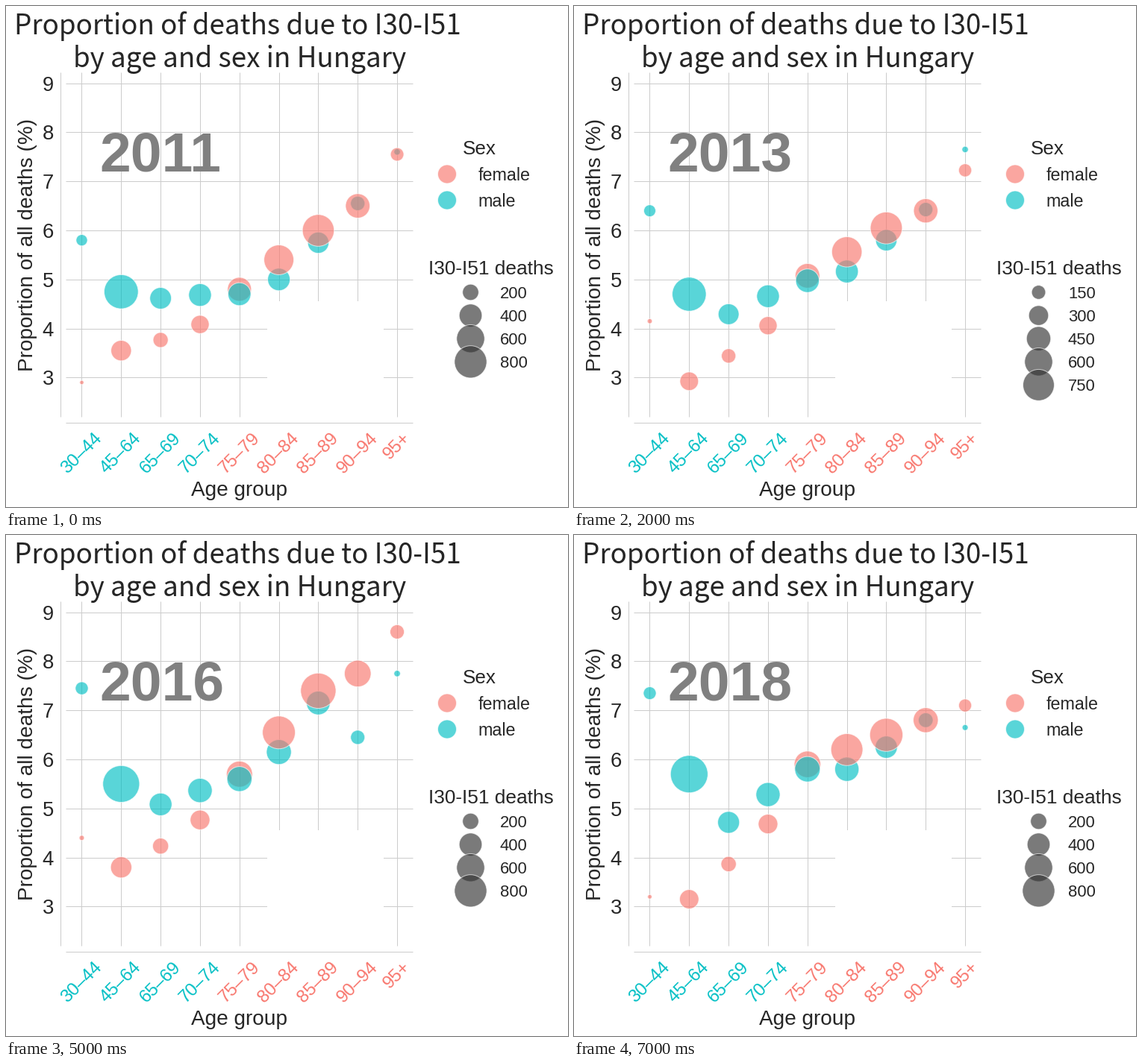
A matplotlib script for the animation above (8000 ms loop, 753 px wide and 672 px high).

```python
import math

import matplotlib.pyplot as plt
import numpy as np
from matplotlib.animation import FuncAnimation
from matplotlib.patches import Circle, Rectangle

W, H, DPI = 753, 672, 64
INK, GRID = "#262626", "#cccccc"
CORAL, TEAL = "#f8766d", "#00bfc4"
SANS = "Liberation Sans"

AGES = ["30–44", "45–64", "65–69", "70–74", "75–79",
        "80–84", "85–89", "90–94", "95+"]
IDX = np.arange(len(AGES))

# Shares (%) at key ages in key years; the rest is interpolated
KEY_YEARS = [2011, 2012, 2014, 2015, 2016, 2018]
FEMALE = {
    0: [2.9, 3.7, 4.6, 3.5, 4.4, 3.2],
    1: [3.55, 3.05, 2.8, 3.35, 3.8, 3.15],
    4: [4.8, 5.2, 4.95, 5.5, 5.7, 5.9],
    6: [6.0, 6.5, 5.6, 6.35, 7.4, 6.5],
    7: [6.5, 6.65, 6.15, 5.95, 7.75, 6.8],
    8: [7.55, 7.6, 6.85, 6.3, 8.6, 7.1],
}
MALE = {
    0: [5.8, 5.2, 7.6, 6.85, 7.45, 7.35],
    1: [4.75, 4.4, 5.0, 5.0, 5.5, 5.7],
    7: [6.55, 7.3, 5.55, 6.05, 6.45, 6.8],
    8: [7.6, 7.15, 8.15, 6.85, 7.75, 6.65],
}
SAG = [0.2, 0.3]                        # female curve dips at 65–74
MALE_GAP = [0.85, 0.6, -0.1, -0.4, -0.25]  # male minus female, 65–89

# All deaths per age group, in hundreds
FEMALE_ALL = [4.5, 90, 46, 62, 91, 126, 129, 70, 18]
MALE_ALL = [17, 188, 77, 84, 85, 77, 60, 24, 4]


def at_year(keys, year):
    return [np.interp(year, KEY_YEARS, row) for row in keys.values()]


def shares(year):
    female = np.interp(IDX, list(FEMALE), at_year(FEMALE, year))
    female[2:4] -= SAG
    male = female.copy()
    male[2:7] += MALE_GAP
    male[list(MALE)] = at_year(MALE, year)
    return female, male


fig = plt.figure(figsize=(W / DPI, H / DPI), dpi=DPI, facecolor="white")
ax = fig.add_axes([0, 0, 1, 1])
ax.set_xlim(0, W)
ax.set_ylim(H, 0)
ax.axis("off")


def pt(px):
    return px * 72 / DPI


def x_pos(i):
    return 101.5 + 52.82 * i


def y_pos(pct):
    return 103.6 + 65.8 * (9 - pct)


def radius(deaths):
    return 0.765 * math.sqrt(deaths)


def line(x0, y0, x1, y1):
    ax.plot([x0, x1], [y0, y1], color=GRID, lw=pt(1), zorder=1,
            solid_capstyle="butt")


def label(x, y, s, size, color=INK, font=SANS, **kw):
    kw.setdefault("va", "baseline")
    return ax.text(x, y, s, fontsize=pt(size), color=color, family=font,
                   zorder=5, **kw)


def bubble(x, y, r, color, zorder=3):
    return ax.add_patch(Circle((x, y), r, facecolor=color, edgecolor="white",
                               lw=pt(1), alpha=0.65, zorder=zorder))


def draw_static():
    for pct in range(3, 10):
        y = y_pos(pct)
        line(80, y, 545, y)
        label(64, y + 10, str(pct), 27.5, ha="right")
    for i, age in enumerate(AGES):
        x = x_pos(i)
        line(x, 89, x, 551)
        label(x, 568.5, age, 24, TEAL if i < 4 else CORAL,
              ha="center", va="top", rotation=45)
    line(73.4, 89, 73.4, 551)
    line(80, 558.8, 545, 558.8)
    ax.add_patch(Rectangle((350, 396), 156, 156, color="white", lw=0,
                           zorder=1.5))

    title = dict(size=36.8, font="Noto Sans CJK JP", ha="center")
    label(310, 38, "Proportion of deaths due to I30-I51", **title)
    label(313, 82, "by age and sex in Hungary", **title)
    label(313, 657, "Age group", 28, ha="center")
    label(36.5, 320.5, "Proportion of all deaths (%)", 28, ha="center",
          rotation=90, rotation_mode="anchor")

    label(634, 199, "Sex", 26, ha="center")
    label(649.5, 360, "I30-I51 deaths", 26.3, ha="center")
    for y, name, color in ((225.5, "female", CORAL), (260.5, "male", TEAL)):
        bubble(591, y, 12.5, color)
        label(632.5, y + 8.5, name, 23.2)


def draw_sex(pcts, totals, color, female):
    for i, (pct, total) in enumerate(zip(pcts, totals)):
        # men lie on top only at 75–79
        on_top = female != (i == 4)
        yield bubble(x_pos(i), y_pos(pct), radius(pct * total), color,
                     3 if on_top else 2)


def draw_sizes(year):
    step = 150 if 2012 <= year <= 2015 else 200
    top = 900 if year == 2014 else 800
    for k, deaths in enumerate(range(step, top + 1, step)):
        y = 384 + 31.1 * k
        yield bubble(622.5, y, radius(deaths), "#333333")
        yield label(662, y + 8, str(deaths), 22)


draw_static()
year_text = label(125, 221.7, "", 75, "#808080", weight="bold")
moving = []


def update(frame):
    year = 2011 + frame
    while moving:
        moving.pop().remove()
    year_text.set_text(str(year))
    female, male = shares(year)
    moving.extend(draw_sex(male, MALE_ALL, TEAL, False))
    moving.extend(draw_sex(female, FEMALE_ALL, CORAL, True))
    moving.extend(draw_sizes(year))
    return moving


anim = FuncAnimation(fig, update, frames=8, interval=1000, repeat=True,
                     init_func=lambda: update(0), blit=False)
plt.show()
```
